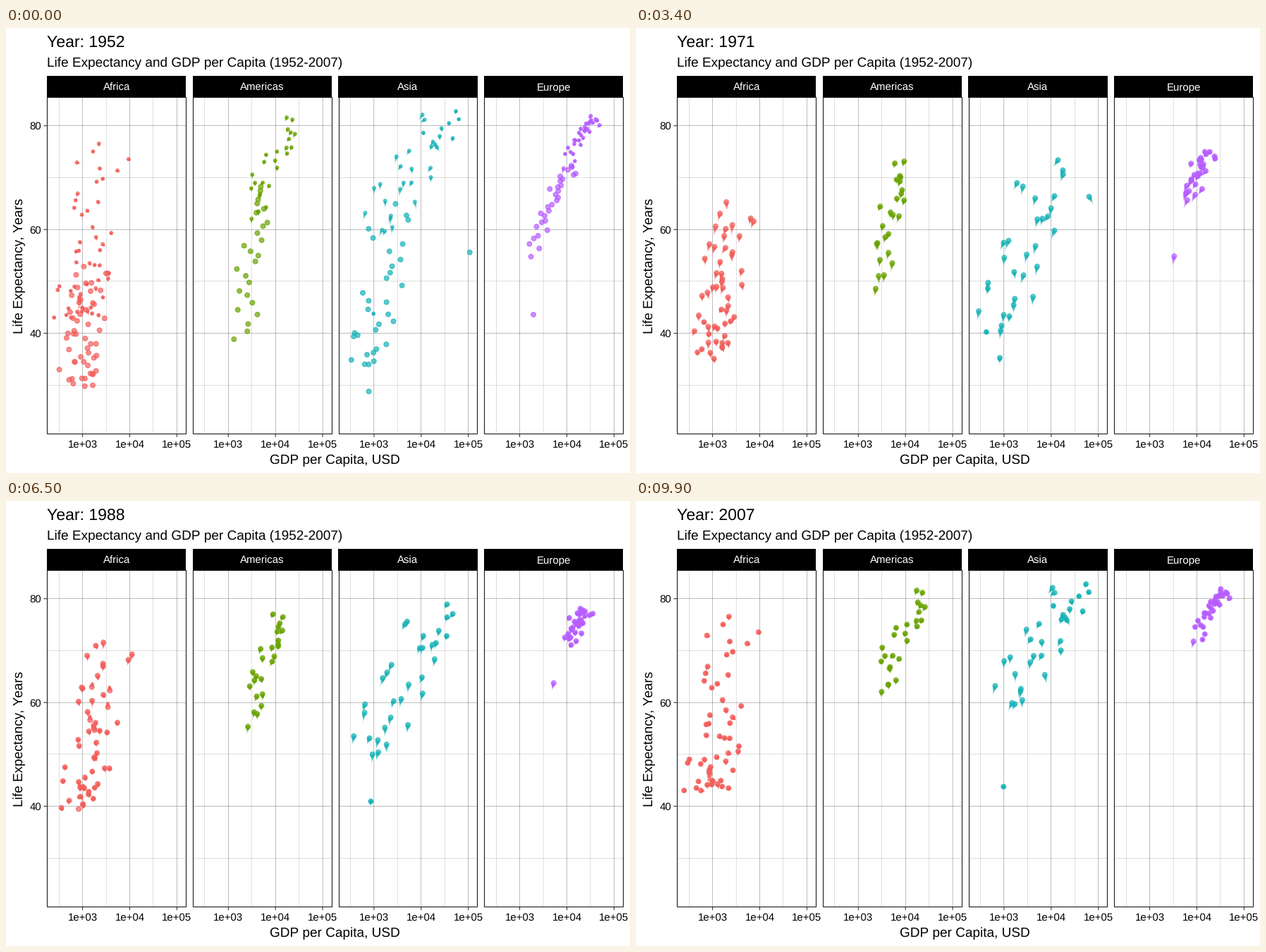
Animation, 885 px wide and 632 px high, one loop 10 s. Source, as a matplotlib script:

```python
import numpy as np
import matplotlib.pyplot as plt
from matplotlib.animation import FuncAnimation
from matplotlib.patches import Rectangle

plt.rcParams.update({"font.family": "Liberation Sans", "text.hinting": "none",
                     "text.hinting_factor": 1})

W, H, DPI = 885, 632, 100
PT = 72 / DPI                      # points per pixel
FRAMES, WAKE = 100, 10
YEARS = np.linspace(1952, 2007, FRAMES)
KNOTS = np.arange(1952, 2008, 5)   # survey years, straight motion in between
LEFT, PITCH, WIDTH = 58.3, 206.66, 196.7
TOP, STRIP, BOTTOM = 68, 98, 576
BASE, SMALL = 19.3, 15.44
INK = "#222222"

rng = np.random.default_rng(7)

# Each triple holds the values in 1952, 1980 and 2007. Life expectancy runs
# from low to high over the ranks, bent by power; log GDP has a mean, a slope
# over the ranks and a scatter.
CONTINENTS = [
    dict(name="Africa", color="#F35E5A", count=51, wobble=.05,
         low=(30, 38.5, 43), high=(53, 69, 76.5), power=(1.35, 1.4, 1.4),
         mean=(3.0, 3.2, 3.15), slope=(.25, .6, .75), scatter=(.26, .27, .25)),
    dict(name="Americas", color="#69A300", count=25, wobble=.03,
         low=(37.6, 51, 61), high=(68.8, 75, 80.7), power=(.86, .7, .75),
         mean=(3.5, 3.75, 3.9), slope=(.45, .6, .9), scatter=(.16, .14, .15)),
    dict(name="Asia", color="#17B3B7", count=30, wobble=.04,
         low=(34, 45, 59), high=(65.4, 76.4, 82.8), power=(1.5, 1, .8),
         mean=(3.1, 3.5, 3.8), slope=(.55, 1.2, 1.35), scatter=(.25, .32, .24)),
    dict(name="Europe", color="#B75CFF", count=29, wobble=.02,
         low=(53.8, 69.3, 71.8), high=(72.7, 76.7, 81.8), power=(.69, .9, .6),
         mean=(3.68, 4.13, 4.33), slope=(.9, .4, .6), scatter=(.11, .13, .1)),
]

# Countries far off the general trend: panel, then (year, log GDP, life).
LANDMARKS = [
    (0, (1952, 2.69, 40), (1987, 2.93, 44), (1992, 2.87, 23.6), (1997, 2.77, 36.1),
     (2007, 2.94, 46.2)),
    (2, (1952, 5.03, 55.6), (1967, 4.91, 64.6), (1982, 4.5, 71.3), (2007, 4.67, 77.6)),
    (2, (1952, 2.89, 28.8), (1987, 2.93, 40.8), (2007, 2.99, 43.8)),
    (2, (1952, 2.57, 39.4), (1972, 2.63, 40.3), (1977, 2.72, 31.2), (1982, 2.8, 51),
     (2007, 3.23, 59.7)),
    (3, (1952, 3.29, 43.6), (1980, 3.63, 60.3), (2007, 3.93, 71.8)),
]


def gdp_x(log_gdp, panel):
    return LEFT + PITCH * panel + 50.3 + (log_gdp - 3) * 66.9


def life_y(life):
    return 433.6 - (life - 40) * 7.37


def curve(triple):
    """Parabola through the three values, taken at the knots."""
    key = np.array([0, 28, 55])
    return np.polyval(np.polyfit(key, triple, 2), KNOTS - 1952)


def continent_paths(c):
    """Log GDP and life expectancy of every country at the knots."""
    n = c["count"]
    rank = ((np.arange(n) + .5) / n)[:, None]
    low, high, power, mean, slope, scatter = (
        curve(c[k]) for k in ("low", "high", "power", "mean", "slope", "scatter"))
    wander = rng.normal(0, c["wobble"], (2, n, len(KNOTS))).cumsum(axis=2)
    offset = rng.normal(size=(n, 1)).clip(-1.6, 1.6)
    gdp = mean + slope * (rank - .5) + scatter * offset + wander[0]
    life = low + (high - low) * rank ** power + 8 * wander[1]
    if c["name"] == "Africa":
        # Epidemic years: some of the better-off countries fall back.
        life[28:44:3] -= 16 * np.clip((KNOTS - 1988) / 14, 0, 1)
    return gdp, life


def at_frames(years, values):
    return np.interp(YEARS, years, values)


tracks, tints = [], []


def add_track(panel, years, gdp, life):
    tracks.append(np.column_stack([gdp_x(at_frames(years, gdp), panel),
                                   life_y(at_frames(years, life))]))
    tints.append(CONTINENTS[panel]["color"])


for p, c in enumerate(CONTINENTS):
    for gdp, life in zip(*continent_paths(c)):
        add_track(p, KNOTS, gdp, life)
for p, *points in LANDMARKS:
    add_track(p, *zip(*points))
tracks = np.stack(tracks, axis=1)      # frame, country, xy

fig = plt.figure(figsize=(W / 100, H / 100), dpi=DPI, facecolor="white")
ax = fig.add_axes([0, 0, 1, 1])
ax.set(xlim=(0, W), ylim=(H, 0))
ax.axis("off")


def label(x, y, text, size, **kw):
    return ax.text(x, y, text, fontsize=size * PT, va="baseline", **kw)


def line(x, y, width, color="black"):
    ax.plot(x, y, color=color, lw=width * PT, zorder=1, snap=False,
            solid_capstyle="butt")


for p, c in enumerate(CONTINENTS):
    left = LEFT + PITCH * p
    right = left + WIDTH
    for life in range(30, 90, 10):
        y, major = life_y(life), life % 20 == 0
        line([left, right], [y, y], .26 if major else .13)
        if major and p == 0:
            line([left - 5, left], [y, y], 1, INK)
            label(left - 8.3, y + 5.5, str(life), SMALL, ha="right")
    for e in np.arange(2.5, 5.1, .5):
        x, major = gdp_x(e, p), e % 1 == 0
        line([x, x], [STRIP, BOTTOM], .26 if major else .13)
        if major:
            line([x, x], [BOTTOM, BOTTOM + 5], 1, INK)
            label(x, 596.2, f"1e+{int(e):02d}", SMALL, ha="center")
    ax.add_patch(Rectangle((left, STRIP), WIDTH, BOTTOM - STRIP, fill=False,
                           ec="#1a1a1a", lw=1.1 * PT, zorder=4))
    ax.add_patch(Rectangle((left - .4, TOP), WIDTH + .8, STRIP - TOP + .5,
                           color="black", lw=0, zorder=5))
    label(left + WIDTH / 2, 89, c["name"], SMALL, ha="center", color="white", zorder=6)

title = label(58, 26.4, "", 1.2 * BASE)
label(58, 55, "Life Expectancy and GDP per Capita (1952-2007)", BASE)
label(466.5, 619, "GDP per Capita, USD", BASE, ha="center")
label(23.6, 337.5, "Life Expectancy, Years", BASE, ha="center",
      rotation=90, rotation_mode="anchor")

# Oldest echoes first, so the current dots lie on top.
ages = np.arange(WAKE - 1, -1, -1)
shrink = np.repeat((1 - ages / WAKE) ** 3, len(tints))
dots = ax.scatter(*np.zeros((2, len(shrink))), s=(6.8 * PT * shrink) ** 2,
                  c=tints * WAKE, alpha=.7, linewidths=1.24 * PT * shrink, zorder=3)


def draw(i):
    title.set_text(f"Year: {YEARS[i]:.0f}")
    dots.set_offsets(tracks[(i - ages) % FRAMES].reshape(-1, 2))
    return title, dots


anim = FuncAnimation(fig, draw, frames=FRAMES, interval=100, repeat=True,
                     repeat_delay=0, init_func=lambda: draw(0))
plt.show()
```
